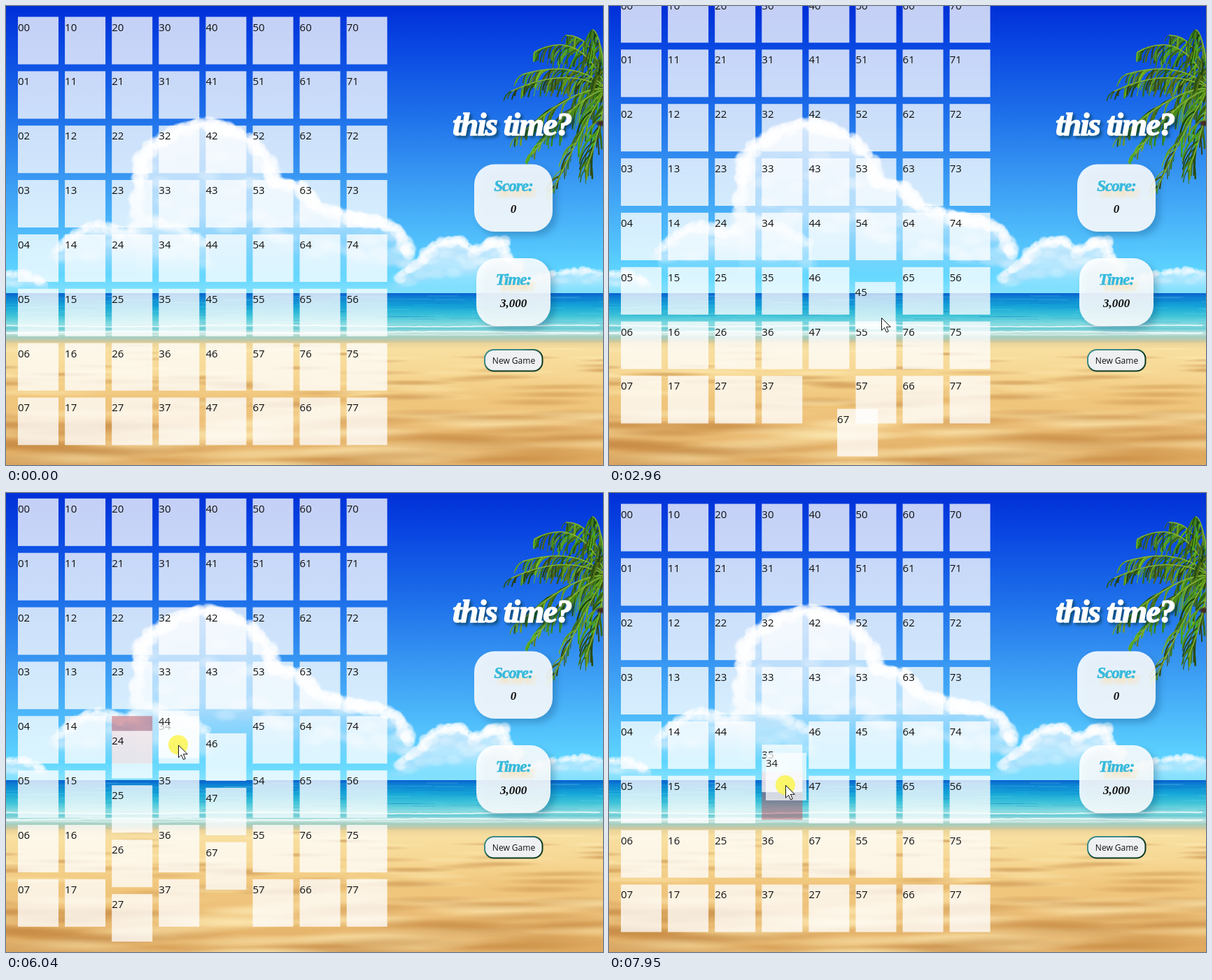
Recreate the animation shown at these times as an HTML page with a canvas. Size 853 by 657 pixels, loop 8 s.

```html
<!DOCTYPE html>
<html lang="en">
<head>
<meta charset="utf-8">
<title>Beach tiles</title>
<style>
  html, body { margin: 0; width: 853px; height: 657px; overflow: hidden; }
  body { position: relative; background: #3aa0f0; }
  canvas, svg.panel { position: absolute; left: 0; top: 0; }
  .tile, .slot, #press, #cursor { position: absolute; left: 0; top: 0; }
  .tile, .slot { width: 57.7px; height: 68px; }
  .tile {
    z-index: 1; background: rgba(255, 255, 255, .77); color: #111;
    font: 15px/29px "Open Sans", "Noto Sans", sans-serif;
  }
  .tile.held { z-index: 2; opacity: .93; }
  .slot { background: rgba(190, 80, 95, .5); }
  #press { z-index: 3; width: 28px; height: 28px; margin: -14px; border-radius: 50%; background: rgba(250, 245, 80, .85); }
  #cursor { z-index: 4; overflow: visible; }
  .script { font-family: "Liberation Serif", serif; font-weight: bold; font-style: italic; text-anchor: middle; }
  .title { font-size: 46px; letter-spacing: -1.6px; fill: #fff; stroke: #fff; stroke-width: 1.6; filter: drop-shadow(3px 3px 2px rgba(0, 50, 60, .65)); }
  .head { font-size: 23px; letter-spacing: -1px; fill: #36b9dc; stroke: #36b9dc; stroke-width: .6; filter: drop-shadow(5px 8px 2px #f6e3c0); }
  .num { font-size: 17px; fill: #111; }
  .card { fill: rgba(255, 255, 255, .88); filter: drop-shadow(6px 6px 5px rgba(0, 50, 90, .28)); }
  .label { font: 12px "Open Sans", "Noto Sans", sans-serif; fill: #111; text-anchor: middle; }
</style>
</head>
<body>
<canvas id="beach" width="853" height="657"></canvas>
<svg class="panel" width="853" height="657">
  <defs>
    <linearGradient id="edge" x2="1" y2="1">
      <stop offset=".3" stop-color="#3c8a88"/><stop offset=".6" stop-color="#0b3a22"/>
    </linearGradient>
  </defs>
  <text class="script title" x="723" y="185">this time?</text>
  <rect class="card" x="669" y="226.5" width="112" height="96.5" rx="29"/>
  <text class="script head" x="725" y="265">Score:</text>
  <text class="script num" x="725" y="296">0</text>
  <rect class="card" x="672" y="361" width="106" height="97" rx="29"/>
  <text class="script head" x="725" y="399">Time:</text>
  <text class="script num" x="725" y="431">3,000</text>
  <rect x="684" y="492" width="82.500" height="30.500" rx="13" fill="#eef0f2" stroke="url(#edge)" stroke-width="2"/>
  <text class="label" x="725.500" y="512">New Game</text>
</svg>
<div class="slot" id="slot"></div>
<div id="press"></div>
<svg id="cursor" width="15" height="22">
  <path d="M.5.5V18.300L4.600 14.400 7.500 21 10.300 19.800 7.400 13.300H13.300Z" fill="#fff" stroke="#111"/>
</svg>
<script>
const $ = id => document.getElementById(id);

// ---------- backdrop ----------
const g = $('beach').getContext('2d');
let seed = 11;
const rnd = (a = 0, b = 1) => {
  seed = (seed * 16807) % 2147483647;
  return a + (b - a) * seed / 2147483647;
};

function fade(y0, y1, stops) {
  const f = g.createLinearGradient(0, y0, 0, y1);
  stops.forEach(([y, c]) => f.addColorStop((y - y0) / (y1 - y0), c));
  return f;
}

function band(y0, y1, stops) {
  g.fillStyle = fade(y0, y1, stops);
  g.fillRect(0, y0, 853, y1 - y0);
}

function puff(x, y, rx, ry, rgb, a, core = .5) {
  g.save();
  g.translate(x, y);
  g.scale(rx, ry);
  const f = g.createRadialGradient(0, 0, 0, 0, 0, 1);
  f.addColorStop(0, `rgba(${rgb},${a})`);
  f.addColorStop(core, `rgba(${rgb},${a * .85})`);
  f.addColorStop(1, `rgba(${rgb},0)`);
  g.fillStyle = f;
  g.fillRect(-1, -1, 2, 2);
  g.restore();
}

function cloud(ridge, base, size, alpha) {
  const top = Math.min(...ridge.map(p => p[1]));
  g.beginPath();
  g.moveTo(ridge[0][0], base);
  ridge.forEach(p => g.lineTo(p[0], p[1] + size * .5));
  g.lineTo(ridge[ridge.length - 1][0], base);
  g.fillStyle = fade(top, base, [
    [top, `rgba(250,253,255,${alpha})`],
    [top + (base - top) * .6, `rgba(225,243,255,${alpha * .8})`],
    [base, 'rgba(190,235,255,0)']]);
  g.fill();
  for (let i = 1; i < ridge.length; i++) {
    const [x0, y0] = ridge[i - 1], [x1, y1] = ridge[i];
    const n = Math.ceil(Math.hypot(x1 - x0, y1 - y0) / 6);
    for (let k = 0; k < n; k++) {
      const x = x0 + (x1 - x0) * k / n, y = y0 + (y1 - y0) * k / n;
      const r = rnd(.5, 1) * size;
      puff(x + rnd(-4, 4), y + r * .8, r, r * .9, '255,255,255', alpha * .8, .7);
      const d = y + rnd(.15, .7) * (base - y);
      puff(x, d, size * 1.3, size * .7, k % 2 ? '255,255,255' : '175,220,250', alpha * .35);
    }
  }
}

function frond(x0, y0, cx, cy, x1, y1, len) {
  for (let i = 0; i <= 46; i++) {
    const u = i / 46, v = 1 - u;
    const x = v * v * x0 + 2 * u * v * cx + u * u * x1;
    const y = v * v * y0 + 2 * u * v * cy + u * u * y1;
    const l = len * (.35 + Math.sin(Math.PI * (.15 + u * .75))) * rnd(.5, .9);
    const lean = rnd(-.75, .2) + (x1 - x0) / 500;
    g.strokeStyle = `hsl(${rnd(78, 105)},${rnd(55, 80)}%,${rnd(14, 42)}%)`;
    g.lineWidth = rnd(1, 2.6);
    g.beginPath();
    g.moveTo(x, y);
    g.quadraticCurveTo(x + l * lean * .8, y + l * .25, x + l * lean, y + l);
    g.stroke();
  }
  g.strokeStyle = '#86b138';
  g.lineWidth = 1.6;
  g.beginPath();
  g.moveTo(x0, y0);
  g.quadraticCurveTo(cx, cy, x1, y1);
  g.stroke();
}

function paintBeach() {
  band(0, 412, [[0, '#002fd8'], [60, '#0a48e2'], [160, '#1f72ea'], [250, '#3a9af3'],
    [320, '#4db9fa'], [385, '#5fd6ff'], [412, '#86e2fd']]);
  cloud([[70, 345], [100, 318], [130, 305], [170, 316], [205, 298], [250, 312], [290, 335]], 385, 13, .6);
  cloud([[186, 290], [192, 215], [205, 192], [225, 182], [245, 168], [285, 158], [320, 166], [350, 184],
    [374, 212], [384, 244], [422, 250], [450, 280], [490, 292], [530, 298], [560, 314], [578, 352]], 395, 15, .85);
  cloud([[560, 382], [585, 366], [600, 345], [625, 330], [650, 328], [668, 346], [690, 331],
    [710, 328], [716, 350], [735, 372]], 408, 12, .8);
  cloud([[0, 378], [25, 376], [60, 392]], 410, 9, .6);
  cloud([[730, 392], [780, 378], [825, 372], [853, 378]], 410, 8, .6);

  band(411, 484, [[411, '#0a5fd0'], [417, '#0c80d2'], [430, '#16a6d8'], [444, '#40c4d8'], [456, '#8adbe0'],
    [462, '#6accd4'], [468, '#c4e6e2'], [474, '#a3cdbf'], [480, '#cfc8a0'], [484, '#e6d29a']]);
  for (let i = 0; i < 150; i++) {
    const y = rnd(413, 456);
    g.fillStyle = i % 2 ? 'rgba(0,90,190,.16)' : 'rgba(150,235,245,.2)';
    g.fillRect(rnd(-40, 853), y, rnd(20, 90), 1);
  }
  for (const [y, a] of [[458, .8], [467, .85], [470, .4]]) {
    g.strokeStyle = `rgba(250,255,255,${a})`;
    g.lineWidth = 1.6;
    g.beginPath();
    for (let x = 0; x <= 853; x += 8) g.lineTo(x, y + Math.sin(x / 70 + y) + rnd(-.4, .4));
    g.stroke();
  }

  band(482, 657, [[482, '#ead398'], [492, '#f8dfa0'], [530, '#f6d692'], [560, '#f0c67c'],
    [600, '#edc079'], [657, '#dfa95f']]);
  g.save();
  g.beginPath();
  g.rect(0, 483, 853, 174);
  g.clip();
  for (let i = 0; i < 170; i++) {
    const depth = rnd(), y = 486 + depth * 175;
    const rgb = i % 2 ? '186,122,52' : '255,238,184';
    puff(rnd(-30, 880), y, rnd(30, 60) + depth * 75, 2 + depth * 9, rgb, rnd(.2, .5), .3);
  }
  g.restore();

  const x = 858, y = 118;
  for (const [cx, cy, tx, ty, l] of [
    [840, 40, 800, 42, 26], [820, 30, 755, 66, 30], [815, 75, 738, 98, 30],
    [800, 85, 722, 122, 24], [810, 115, 728, 190, 30], [815, 130, 752, 212, 34],
    [835, 150, 780, 268, 32], [850, 180, 828, 235, 38], [850, 35, 838, 34, 30]
  ]) frond(x, y, cx, cy, tx, ty, l);
  puff(851, 168, 10, 5, '60,25,20', .9);
}
paintBeach();

// ---------- motion ----------
const LOOP = 8000;
const columns = ['00 01 02 03 04 05 06 07', '10 11 12 13 14 15 16 17', '20 21 22 23 24 25 26 27',
  '30 31 32 33 34 35 36 37', '40 41 42 43 44 45 46 47', '50 51 52 53 54 55 57 67',
  '60 61 62 63 64 65 76 66', '70 71 72 73 74 56 75 77'];

// screen updates: start, end, number of steps
const bursts = [[490, 630, 3], [920, 1670, 12], [1740, 2490, 11], [2550, 2680, 3], [2960, 3160, 4],
  [3500, 4250, 12], [4320, 4660, 6], [4810, 5560, 12], [5630, 6390, 11], [6520, 7270, 11],
  [7340, 7340, 1], [7610, 7950, 6]];

// time, x, y
const pointer = [[0, 900, 700], [489, 900, 700], [490, 795, 652], [560, 766, 648], [620, 766, 660],
  [919, 797, 660], [920, 797, 650], [1600, 326, 461], [1740, 326, 463], [2490, 385, 440], [2680, 389, 446],
  [3450, 389, 446], [4180, 372, 360], [4250, 372, 361], [4388, 380, 403], [4660, 384, 434], [4750, 384, 434],
  [5492, 316, 372], [5630, 314, 375], [6390, 178, 346], [6520, 179, 343], [6595, 179, 343], [7270, 250, 368],
  [7340, 246, 368], [7610, 247, 372], [7950, 252, 418]];

const scrolling = [[2250, 0], [2680, 56], [2880, 56], [2960, 31], [3160, 0],
  [5950, 0], [6390, 56], [6520, 56], [6595, 39], [6800, 0]];

// start, end, tiles, columns moved, rows moved
const moves = [
  [2200, 2201, '45', 1, 0], [2200, 2420, '46 47', 0, -1], [2200, 2420, '55 57 67', 0, 1],
  [2830, 3160, '67', -1, -1],
  [4450, 4600, '54', 0, 1], [4450, 4650, '45', 0, -1],
  [5950, 5951, '44', -2, 0], [5860, 6080, '46 47 67', 0, -1], [5950, 6170, '24 25 26 27', 0, 1],
  [6600, 6870, '27', 2, -1],
  [7810, 7960, '34', 0, 1], [7850, 8025, '35', 0, -1]];

// tile, press, release, grip inside the tile
const drags = [['45', 1735, 2880, 38, 62], ['54', 4240, 4780, 19, 33],
  ['44', 5625, 6530, 28, 49], ['34', 7605, 9000, 28, 46]];
const SETTLE = 280;

const clamp = u => Math.max(0, Math.min(1, u));
const mix = (a, b, u) => a + (b - a) * u;
const smooth = u => u * u * (3 - 2 * u);

function track(rows, t, ease = u => u) {
  if (t <= rows[0][0]) return rows[0].slice(1);
  for (let i = 1; i < rows.length; i++) {
    const a = rows[i - 1], b = rows[i];
    if (t < b[0]) {
      const u = ease((t - a[0]) / (b[0] - a[0]));
      return a.slice(1).map((v, k) => mix(v, b[k + 1], u));
    }
  }
  return rows[rows.length - 1].slice(1);
}

function stepTime(t) {
  let at = 0;
  for (const [from, to, n] of bursts) {
    if (t < from) break;
    const step = (to - from) / (n - 1) || 1;
    at = Math.min(to, from + Math.floor((t - from + 10) / step) * step);
  }
  return at;
}

const tiles = {};
columns.forEach((names, col) => names.split(' ').forEach((name, row) => {
  const el = document.createElement('div');
  el.className = 'tile';
  el.textContent = name;
  document.body.append(el);
  tiles[name] = { el, col, row, moves: moves.filter(m => m[2].split(' ').includes(name)) };
}));

const place = (el, x, y) => { el.style.transform = `translate(${x}px,${y}px)`; };
const show = (el, on) => { el.style.visibility = on ? 'visible' : 'hidden'; };

function home(tile, t) {
  let { col, row } = tile;
  for (const [from, to, , dc, dr] of tile.moves) {
    const u = clamp((t - from) / (to - from));
    col += dc * u;
    row += dr * u;
  }
  return [17 + 67.1 * col, 15.5 + 77.85 * row];
}

function grip(t, ox, oy) {
  const [x, y] = track(pointer, t, smooth);
  return [x - ox, y - oy + track(scrolling, t)[0]];
}

function render(now) {
  const t = stepTime(now);
  const [scroll] = track(scrolling, t);
  const drag = drags.find(d => t >= d[1] && t < d[2] + SETTLE);
  const pressed = !!drag && t < drag[2];

  for (const name in tiles) {
    const tile = tiles[name], held = !!drag && drag[0] === name;
    let [x, y] = home(tile, t);
    if (held) {
      const [, , release, ox, oy] = drag;
      if (pressed) place($('slot'), x, y - scroll);
      const [gx, gy] = grip(Math.min(t, release), ox, oy);
      const u = 1 - (1 - clamp((t - release) / SETTLE)) ** 1.5;
      x = mix(gx, x, u);
      y = mix(gy, y, u);
    }
    tile.el.classList.toggle('held', held);
    place(tile.el, x, y - scroll);
  }

  const [px, py] = track(pointer, t, smooth);
  place($('cursor'), px, py);
  place($('press'), px, py);
  show($('press'), pressed);
  show($('slot'), pressed);
}

const start = performance.now();
function loop() {
  render((performance.now() - start) % LOOP);
  requestAnimationFrame(loop);
}
loop();
</script>
</body>
</html>
```
